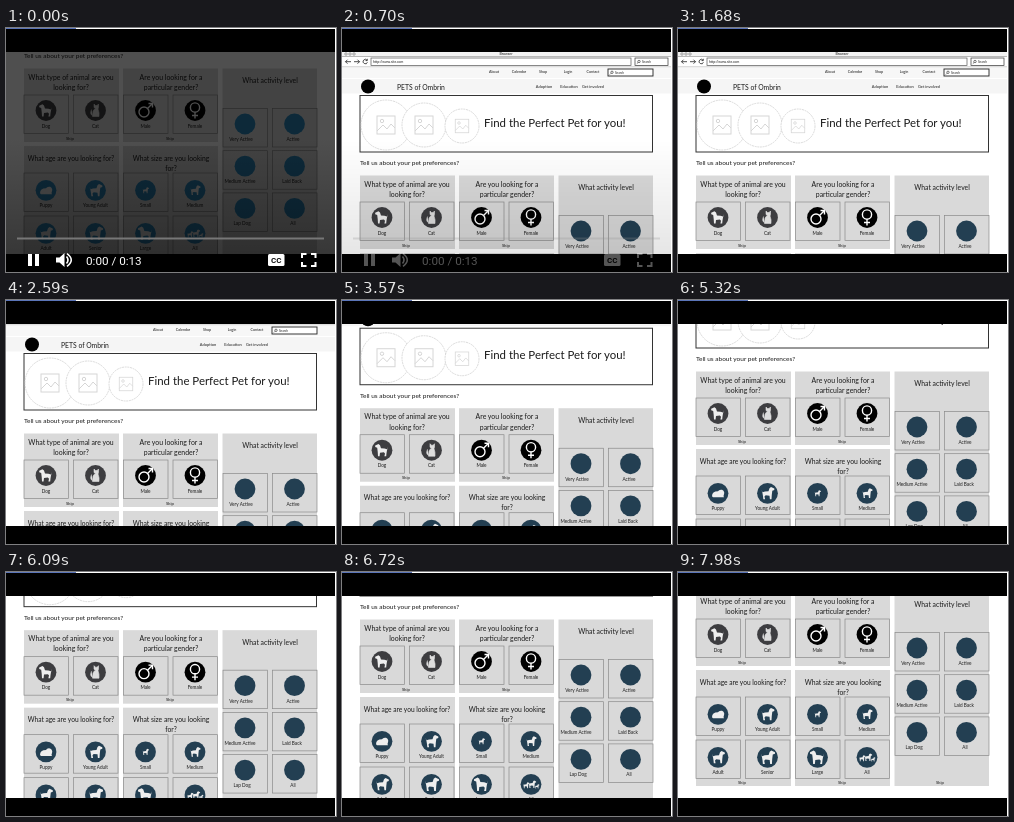
An HTML page for the animation above (8000 ms loop, 330 px wide and 244 px high).

```html
<!DOCTYPE html>
<html lang="en">
<head>
<meta charset="utf-8">
<title>Pet finder walkthrough</title>
<style>
  html, body { margin: 0; height: 100%; overflow: hidden; background: #000; }
  svg { display: block; width: 100vw; height: 100vh; }
  text { font-family: Lato, "Open Sans", sans-serif; fill: #1b1b1b; }
  .time { font-family: Roboto, sans-serif; fill: #fff; }
</style>
</head>
<body>
<svg viewBox="0 0 330 244">
  <defs>
    <clipPath id="view"><rect y="24" width="330" height="202"/></clipPath>
    <linearGradient id="shade" x1="0" y1="0" x2="0" y2="1">
      <stop offset="0" stop-opacity="0"/><stop offset="1" stop-opacity=".3"/>
    </linearGradient>
  </defs>
  <rect width="330" height="244"/>
  <g clip-path="url(#view)"><g id="video"><rect y="24" width="330" height="202" fill="#fff"/><g id="page"></g></g></g>
  <g id="controls"></g>
  <path d="M70 0H330V244H329V1H70Z" fill="#fff"/>
  <rect width="70" height="1" fill="#5a74b8"/>
</svg>
<script>
const $ = id => document.getElementById(id);
const DARK = '#3d3d40', BLUE = 'var(--blue)', CARD = '#d9d9d9', LINE = '#8a8a8a';
const LOOP = 8000, STEP = 70;

const text = (s, x, y, size, anchor = 'middle') =>
  `<text x="${x}" y="${y}" font-size="${size}" text-anchor="${anchor}">${s}</text>`;
const rect = (x, y, w, h, fill, stroke = 'none', sw = .7) =>
  `<rect x="${x}" y="${y}" width="${w}" height="${h}" fill="${fill}" stroke="${stroke}" stroke-width="${sw}"/>`;
const disc = (x, y, r, fill, more = '') => `<circle cx="${x}" cy="${y}" r="${r}" fill="${fill}" ${more}/>`;
const path = (d, fill, stroke = 'none', sw = 1) =>
  `<path d="${d}" fill="${fill}" stroke="${stroke}" stroke-width="${sw}"/>`;
const at = (x, y, s, body, flip = 1) => `<g transform="translate(${x} ${y}) scale(${s * flip} ${s})">${body}</g>`;
const lens = (x, y) => disc(x, y, 1.2, 'none', 'stroke="#222" stroke-width=".6"') +
  path(`M${x - 1} ${y + 1}l-1.2 1.2`, 'none', '#222', .6);

// Icons, drawn around 0,0
const dog = path('M-6-3.5L-5-1Q-3-2 1-2L2-5 3.5-6.2 6.8-4.7V-3.2L4.8-2.5 4.3 1.5 4 6H2.4L2 2.4-1.8 2-3 3.2-2.4 6H-4.2L-4.5 3-5 0Z', '#eee');
const cat = path('M-3 6L-2.5 1Q-2-1 0-2L-1.5-3V-6.5L0-5H1.5L3-6.5V-3L2.5-1.5Q4 2 3.5 6ZM-3 5Q-6 4-4-1', '#ddd', '#ddd', .6);
const puppy = path('M-6 3Q-6-2 0-2Q1-4 4-3.5Q7-2 6 1Q5 3 6 4H-5Z', '#eee');
const male = disc(-1.5, 1.5, 5, 'none', 'stroke="#fff" stroke-width="1.4"') +
  path('M2-2L7-7M3-7H7V-3', 'none', '#fff', 1.4);
const female = disc(0, -3, 4.6, 'none', 'stroke="#fff" stroke-width="1.4"') +
  path('M0 1.6V8M-3 5H3', 'none', '#fff', 1.4);
const pack = at(-5, 1, .5, dog) + at(1, 0, .6, dog) + at(6, 2, .35, dog);

function cell(x, y, label, labelX, color, icon = '', cy = 15.5) {
  return rect(x, y, 44.5, 38.5, CARD, LINE) + disc(x + 22, y + cy, 10.4, color) +
    at(x + 22, y + cy, 1, icon) + text(label, labelX, y + cy + 17, 4.7);
}

// Pairs of cells across a card
function cells(x, y, items, color, cy) {
  return items.map(([label, icon], i) => {
    const cx = x + (i % 2) * 49.5;
    return cell(cx, y + (i >> 1) * 43, label, cx + 22, color, icon, cy);
  }).join('');
}

function picture(x, y, r, s) {
  return disc(x, y, r, '#fff', 'stroke="#ccc" stroke-width=".7" stroke-dasharray="2 .7"') +
    at(x, y, s, rect(-9, -9, 18, 18, 'none', '#d6d6d6', 1) + disc(-4, -4, 1.7, 'none', 'stroke="#d6d6d6"') +
      path('M-9 6L-3 0 1 4 5-1 9 3', 'none', '#d6d6d6'));
}

function browser() {
  const tabs = [['About', 152], ['Calendar', 177], ['Shop', 201], ['Login', 226], ['Contact', 251]];
  const links = [['Adoption', 202], ['Education', 227], ['Get involved', 251]];
  return rect(0, 24, 330, 4.5, '#f2f2f2') +
    [4, 8, 12].map(x => disc(x, 26, 1.2, '#fff', 'stroke="#444" stroke-width=".5"')).join('') +
    text('Browser', 164, 27.3, 3.6) +
    path('M0 28.5H330M0 39H330', 'none', '#777', .5) +
    path('M9 33.7H3.5l2-2m-2 2l2 2M12 33.7h5.5l-2-2m2 2l-2 2M25 32.2a2.2 2.2 0 1 0 .4 2M25.3 30.8v1.8h-1.8', 'none', '#222', .8) +
    rect(29, 30, 260, 7.5, '#fff', '#555') + text('http://www.site.com', 31, 35, 3.4, 'start') +
    rect(293, 30, 33, 7.5, '#fff', '#333') + lens(297, 33.5) + text('Search', 300, 35, 3, 'start') +
    rect(0, 39.3, 330, 10.7, '#f7f7f7') + tabs.map(([s, x]) => text(s, x, 45.4, 3.7)).join('') +
    rect(266, 41, 45, 7, '#fff', '#222', .9) + lens(270, 44.3) + text('Search', 273, 45.8, 3, 'start') +
    rect(0, 51, 330, 14.5, '#f5f5f5') + disc(26, 58.5, 7, '#000') +
    text('PETS of Ombrin', 55, 61.5, 6.8, 'start') +
    links.map(([s, x]) => text(s, x, 60.4, 4)).join('');
}

function hero() {
  return rect(18, 67.5, 292.5, 56.5, '#fff', '#333', 1) +
    picture(44, 97, 25, 1) + picture(82, 97, 22, 1) + picture(120, 98, 17, .75) +
    text('Find the Perfect Pet for you!', 142, 98.5, 11.45, 'start');
}

function form() {
  const skip = (x, y) => text('Skip', x, y, 4.3);
  const levels = [['Very Active', 235], ['Active', 287], ['Medium Active', 234],
    ['Laid Back', 286], ['Lap Dog', 236], ['All', 287]];
  return text('Tell us about your pet preferences?', 18, 137.3, 6.5, 'start') +
    [18, 117].map(x => rect(x, 147.5, 95, 73.5, CARD) + rect(x, 225, 95, 116, CARD)).join('') +
    rect(216.5, 147.5, 94.5, 193.5, CARD) +
    text('What type of animal are you', 65, 158.6, 6.9) + text('looking for?', 65, 168.8, 6.9) +
    text('Are you looking for a', 165, 158.6, 6.9) + text('particular gender?', 165, 168.8, 6.9) +
    text('What activity level', 264, 161.9, 6.8) +
    text('What age are you looking for?', 65, 239.7, 6.6) +
    text('What size are you looking', 165, 239.7, 6.8) + text('for?', 165, 249.7, 6.8) +
    cells(18, 174, [['Dog', at(0, 0, 1, dog, -1)], ['Cat', cat]], DARK) +
    cells(117.5, 174, [['Male', male], ['Female', female]], '#000') +
    cells(18, 252, [['Puppy', puppy], ['Young Adult', dog], ['Adult', dog],
      ['Senior', at(0, 0, 1.1, dog)]], BLUE, 17.3) +
    cells(117.5, 252, [['Small', at(0, 0, .5, dog)], ['Medium', at(0, 0, .8, dog)],
      ['Large', at(0, 0, 1.1, dog, -1)], ['All', pack]], BLUE, 17.3) +
    levels.map(([s, x], i) =>
      cell(217 + (i % 2) * 49.5, 187.5 + (i >> 1) * 42.2, s, x, BLUE)).join('') +
    skip(64, 218.5) + skip(164, 218.5) + skip(64, 338.5) + skip(164, 338.5) + skip(262, 338.5);
}

function player() {
  return '<rect y="110" width="330" height="116" fill="url(#shade)"/>' +
    rect(11, 209.5, 307, 2, '#777') +
    rect(22, 226, 4, 12, '#fff') + rect(29, 226, 4, 12, '#fff') +
    path('M50 229.5H53.5L58.5 225V239L53.5 234.5H50Z', '#fff') +
    path('M60.5 228.5Q63.5 232 60.5 235.5M61 225.7Q69.5 232 61 238.3', 'none', '#fff', 1.6) +
    '<text class="time" x="80" y="236.7" font-size="11.7">0:00 / 0:13</text>' +
    '<rect x="262" y="226" width="16.5" height="12" rx="1.5" fill="#fff"/>' +
    '<text x="270.2" y="235" font-size="8" font-weight="700" text-anchor="middle" style="font-family:Roboto,sans-serif;fill:#111">CC</text>' +
    path('M296 230V226H300.5M305 226H309.5V230M309.5 234V238H305M300.5 238H296V234', 'none', '#fff', 2);
}

// [time, scroll] points; straight runs between them
const scrollPath = [[1820, 0], [2590, 14], [2660, 19], [3080, 36], [3360, 36], [4130, 48],
  [4410, 52], [5040, 70], [5320, 76], [5390, 76], [6230, 92], [6720, 100], [7070, 108],
  [7560, 108], [7980, 127], [8000, 127]];

function scrollAt(t) {
  const i = scrollPath.findIndex(p => p[0] >= t);
  if (i === 0) return 0;
  const [t0, a] = scrollPath[i - 1], [t1, b] = scrollPath[i];
  return a + (b - a) * (t - t0) / (t1 - t0);
}

const clamp = v => Math.max(0, Math.min(1, v));

function draw(now) {
  const t = Math.floor((now % LOOP) / STEP) * STEP;
  const poster = t < 630;
  const scroll = poster ? 107 : scrollAt(t);
  $('page').setAttribute('transform', `translate(0 ${-scroll})`);
  $('page').style.setProperty('--blue', poster ? '#2a86b8' : '#233f52');
  $('video').setAttribute('opacity', poster ? .31 * clamp(1 - t / 420) : 1);
  $('controls').setAttribute('opacity', clamp(1 - (t - 560) / 210));
  requestAnimationFrame(draw);
}

$('page').innerHTML = browser() + hero() + form();
$('controls').innerHTML = player();
draw(performance.now());
</script>
</body>
</html>
```
